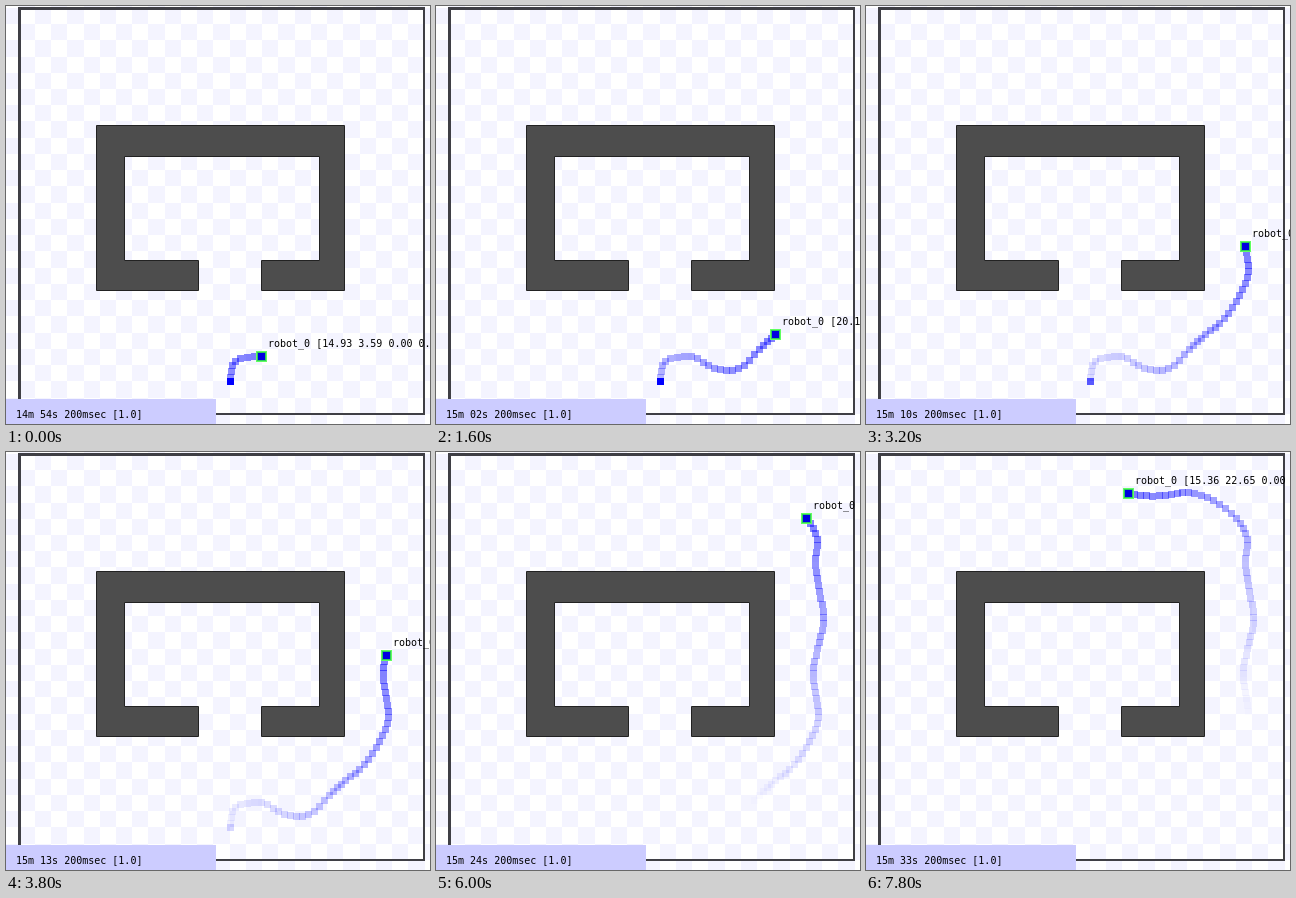
Recreate the animation shown at these times as an HTML page with a canvas. Size 424 by 418 pixels, loop 8 s.

```html
<!DOCTYPE html>
<html>
<head>
<meta charset="utf-8">
<style>
  html, body { margin: 0; height: 100%; overflow: hidden; background: #fff; }
  canvas { display: block; }
</style>
</head>
<body>
<canvas id="stage" width="424" height="418"></canvas>
<script>
const ctx = document.getElementById('stage').getContext('2d');
const LOOP = 8000, TICK = 200;          // one tick shows one simulated second
const METRE = 16.24, ORIGIN = { x: 12.55, y: 408.3 };
const CLOCK_START = 14 * 60 + 54;
const TRAIL_SECONDS = 25, TRAIL_STEP = 0.5;

// The robot waits until DEPARTURE, then passes one key point every KEY_STEP seconds.
const DEPARTURE = -4, KEY_STEP = 2;
const route = [
  [224, 375], [229, 355], [255, 350], [278, 362], [302.3, 362.3], [323, 343],
  [339, 328], [358, 312], [373, 289], [382, 265], [379, 240], [377, 215],
  [383, 190], [387, 165], [383, 139], [379, 113], [381, 87], [370, 66],
  [347, 48], [322, 40], [299, 43], [274, 43], [253, 38]
];
const room = new Path2D('M90.5 119.5H338.5V284.5H255.5V254.5H313.5V150.5' +
                        'H118.5V254.5H192.5V284.5H90.5Z');

function catmullRom(a, b, c, d, t) {
  return b + t / 2 * (c - a + t * (2 * a - 5 * b + 4 * c - d + t * (3 * (b - c) + d - a)));
}

function robotAt(second) {
  const progress = Math.max(0, (second - DEPARTURE) / KEY_STEP);
  const i = Math.floor(progress);
  const point = n => route[Math.min(Math.max(n, 0), route.length - 1)];
  const along = axis => catmullRom(
    ...[-1, 0, 1, 2].map(offset => point(i + offset)[axis]), progress - i);
  return { x: along(0), y: along(1) };
}

function box(x, y, w, h, color) {
  ctx.fillStyle = color;
  ctx.fillRect(x, y, w, h);
}

// Odd sizes keep the square centred on a pixel.
function square(p, size, color) {
  const half = (size - 1) / 2;
  box(Math.round(p.x) - half, Math.round(p.y) - half, size, size, color);
}

function text(string, x, y) {
  ctx.fillStyle = '#000';
  ctx.fillText(string, Math.round(x), Math.round(y));
}

function drawFloor() {
  const column = i => Math.round(ORIGIN.x + i * METRE);
  const row = j => Math.floor(ORIGIN.y - j * METRE);
  box(0, 0, 424, 418, '#fff');
  for (let i = -1; i < 26; i++)
    for (let j = -1; j < 26; j++)
      if ((i + j) % 2)
        box(column(i), row(j + 1), column(i + 1) - column(i), row(j) - row(j + 1), '#f4f4ff');
}

function drawWalls() {
  const edge = '#3f3f45';
  box(12, 1, 407, 3, edge);
  box(12, 1, 3, 408, edge);
  box(417, 1, 2, 408, edge);
  box(12, 407, 407, 2, edge);

  ctx.fillStyle = '#4d4d4d';
  ctx.fill(room);
  ctx.strokeStyle = '#222';
  ctx.stroke(room);
}

function drawTrail(second) {
  for (let age = TRAIL_SECONDS; age > 0; age -= TRAIL_STEP) {
    const time = second - age;
    const alpha = 0.5 * (1 - age / TRAIL_SECONDS);
    const layers = time < DEPARTURE ? 2 : 1;   // waiting builds up a solid spot
    for (let n = 0; n < layers; n++) square(robotAt(time), 7, `rgba(0,0,255,${alpha})`);
  }
}

function drawRobot(second) {
  const p = robotAt(second);
  square(p, 11, '#60ff60');
  square(p, 9, '#30c860');
  square(p, 7, '#0000e0');
  const east = ((p.x - ORIGIN.x) / METRE).toFixed(2);
  const north = ((ORIGIN.y - p.y) / METRE).toFixed(2);
  text(`robot_0 [${east} ${north} 0.00 0.00]`, p.x + 7.3, p.y - 9);
}

function drawClock(second) {
  const total = CLOCK_START + second;
  const seconds = String(total % 60).padStart(2, '0');
  box(0, 393, 210, 25, '#ccccff');
  text(`${Math.floor(total / 60)}m ${seconds}s 200msec [1.0]`, 10, 412);
}

function frame(elapsed) {
  const second = Math.floor((elapsed % LOOP) / TICK);
  drawFloor();
  drawWalls();
  drawTrail(second);
  drawRobot(second);
  drawClock(second);
  requestAnimationFrame(() => frame(performance.now() - start));
}

ctx.font = '10px "DejaVu Sans Mono", monospace';
const start = performance.now();
frame(0);
</script>
</body>
</html>
```
